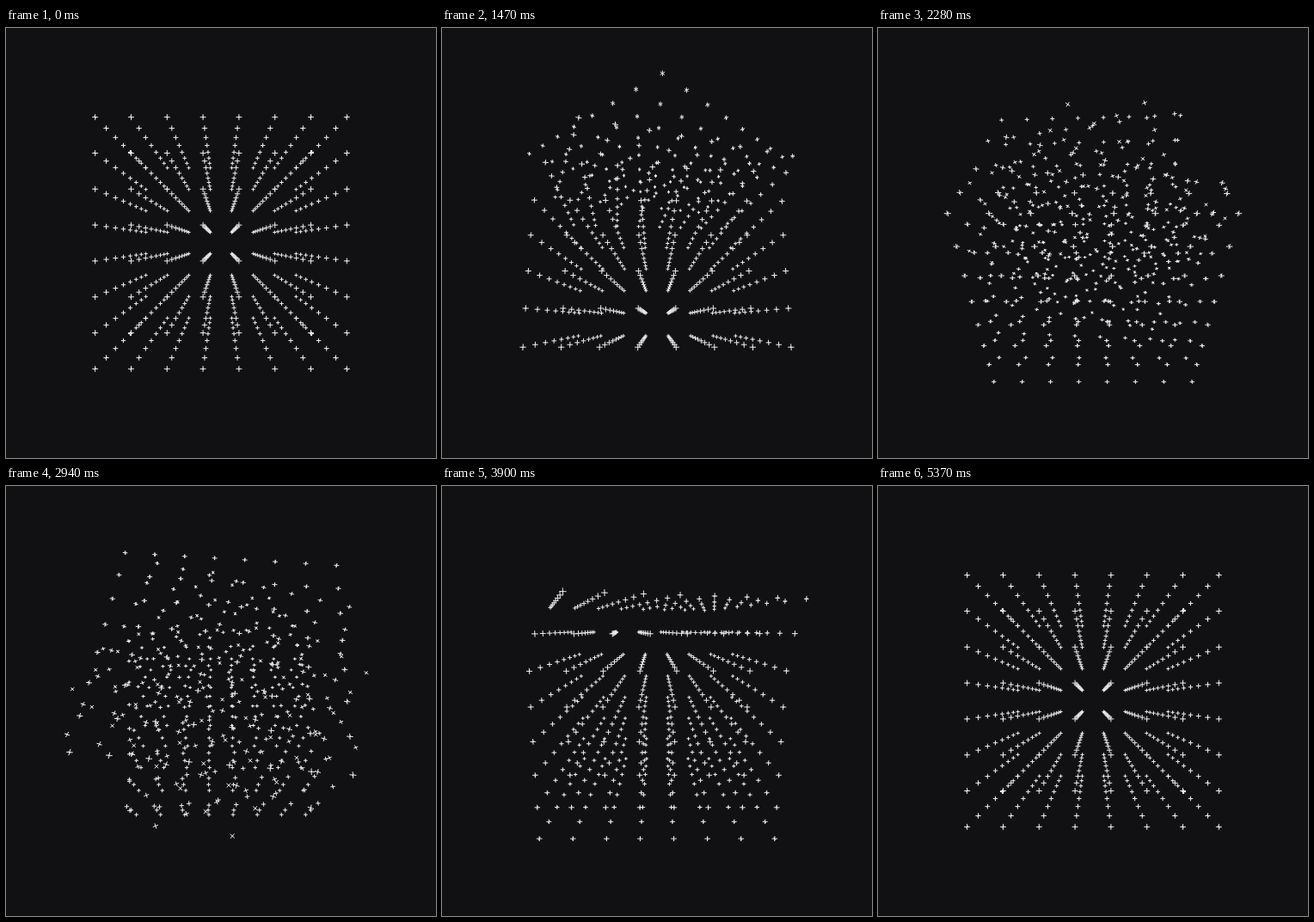
Write an HTML page with a canvas that moves like this. It is 500 px wide and 500 px high and loops after 5.4 s.

```html
<!DOCTYPE html>
<html lang="en">
<head>
<meta charset="utf-8">
<title>Twisting lattice</title>
<style>
  html, body { margin: 0; height: 100%; overflow: hidden; background: #111113; }
  canvas { display: block; }
</style>
</head>
<body>
<canvas id="stage" width="500" height="500"></canvas>
<script>
const ctx = document.getElementById('stage').getContext('2d');
const LOOP = 5400, STEP = 30, START = 240, MOVE = 4860;
const N = 8, GAP = 31.25, ARM = 2.6;
const CAMERA = 250 / Math.tan(Math.PI / 6);

const clamp = v => Math.min(1, Math.max(0, v));
const ease = v => {
  const p = clamp(v);
  return p < 0.5 ? 4 * p ** 3 : 1 - 4 * (1 - p) ** 3;
};
const coord = i => (i - (N - 1) / 2) * GAP;

// Twist a layer about the vertical axis, tilt the whole cube, then project.
function projector(twist, tilt) {
  const ct = Math.cos(twist), st = Math.sin(twist);
  const cx = Math.cos(tilt), sx = Math.sin(tilt);
  return (x, y, z) => {
    const x1 = x * ct + z * st;
    const z1 = z * ct - x * st;
    const scale = CAMERA / (CAMERA - z1 * cx - y * sx);
    return [250 + x1 * scale, 250 + (y * cx - z1 * sx) * scale];
  };
}

function drawCross(project, x, y, z) {
  const line = (dx, dy, dz) => {
    ctx.moveTo(...project(x - dx, y - dy, z - dz));
    ctx.lineTo(...project(x + dx, y + dy, z + dz));
  };
  ctx.beginPath();
  line(ARM, 0, 0);
  line(0, ARM, 0);
  line(0, 0, ARM);
  ctx.stroke();
}

function draw(time) {
  const p = clamp((time - START) / MOVE);
  const tilt = Math.PI * ease(p);
  ctx.fillStyle = '#111113';
  ctx.fillRect(0, 0, 500, 500);
  ctx.strokeStyle = '#ebebeb';
  ctx.lineWidth = 1;
  for (let layer = 0; layer < N; layer++) {
    const project = projector(Math.PI / 2 * ease(2 * p - layer / N), tilt);
    for (let i = 0; i < N; i++)
      for (let k = 0; k < N; k++)
        drawCross(project, coord(i), coord(layer), coord(k));
  }
}

const begin = performance.now();
function tick() {
  const time = (performance.now() - begin) % LOOP;
  draw(Math.floor(time / STEP) * STEP);
  requestAnimationFrame(tick);
}
tick();
</script>
</body>
</html>
```
